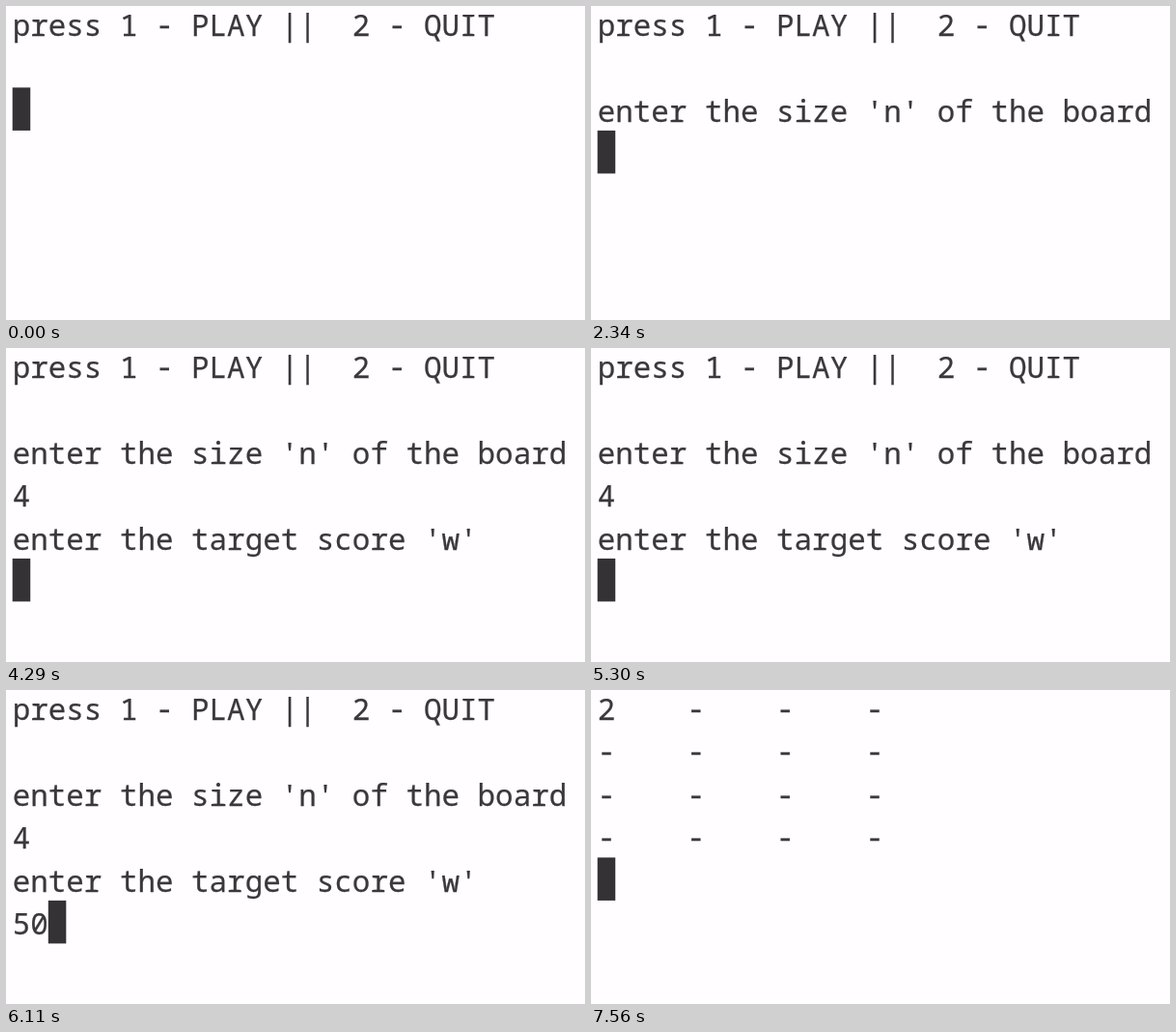
An HTML page for the animation above (8 s loop, 600 by 325 pixels).

```html
<!DOCTYPE html>
<html lang="en">
<head>
<meta charset="utf-8">
<title>Terminal board game</title>
<style>
  html, body { margin: 0; width: 100%; height: 100%; overflow: hidden; background: #fffdff; }
  svg { display: block; width: 600px; height: 325px; }
  text {
    font: 30.9px "Noto Sans Mono", "DejaVu Sans Mono", monospace;
    fill: #3a383a; stroke: #3a383a; stroke-width: .25px; white-space: pre;
  }
</style>
</head>
<body>
<svg viewBox="0 0 600 325">
  <g id="lines"></g>
  <rect id="cursor" fill="#343234"/>
</svg>
<script>
const LOOP = 8000, LEFT = 6.7, CELL = 18.54, ROW = 44.5, TOP = -4.6, BASE = 35.2;
const lines = document.getElementById('lines');
const cursor = document.getElementById('cursor');

const menu = 'press 1 - PLAY ||  2 - QUIT\n\n';
const askSize = menu + "enter the size 'n' of the board\n";
const askScore = askSize + "4\nenter the target score 'w'\n";
const row = first => [first, '-', '-', '-'].join('    ') + '\n';

// The cursor always sits right after the last character.
const steps = [
  [0, menu],
  [780, askSize],
  [3380, askSize + '4'],
  [4290, askScore],
  [5980, askScore + '5'],
  [6110, askScore + '50'],
  [6890, row('2') + row('-').repeat(3)]
];

const rows = Array.from({ length: 7 }, (_, i) => {
  const el = document.createElementNS('http://www.w3.org/2000/svg', 'text');
  el.setAttribute('x', LEFT);
  el.setAttribute('y', TOP + i * ROW + BASE);
  return lines.appendChild(el);
});

// Dashes sit a little above their default height.
function write(el, text) {
  el.replaceChildren(...text.split(/(-)/).filter(Boolean).map(part => {
    const span = document.createElementNS('http://www.w3.org/2000/svg', 'tspan');
    span.textContent = part;
    if (part === '-') span.setAttribute('baseline-shift', '1.2');
    return span;
  }));
}

let shown = null;

function draw(time) {
  const screen = steps.filter(([start]) => start <= time).pop()[1];
  if (screen === shown) return;
  shown = screen;
  const parts = screen.split('\n');
  rows.forEach((el, i) => write(el, parts[i] || ''));
  const last = parts.length - 1;
  cursor.setAttribute('x', LEFT + parts[last].length * CELL);
  cursor.setAttribute('y', TOP + last * ROW);
  cursor.setAttribute('width', CELL);
  cursor.setAttribute('height', ROW);
}

const begin = performance.now();
function tick() {
  draw((performance.now() - begin) % LOOP);
  requestAnimationFrame(tick);
}
draw(0);
requestAnimationFrame(tick);
</script>
</body>
</html>
```
